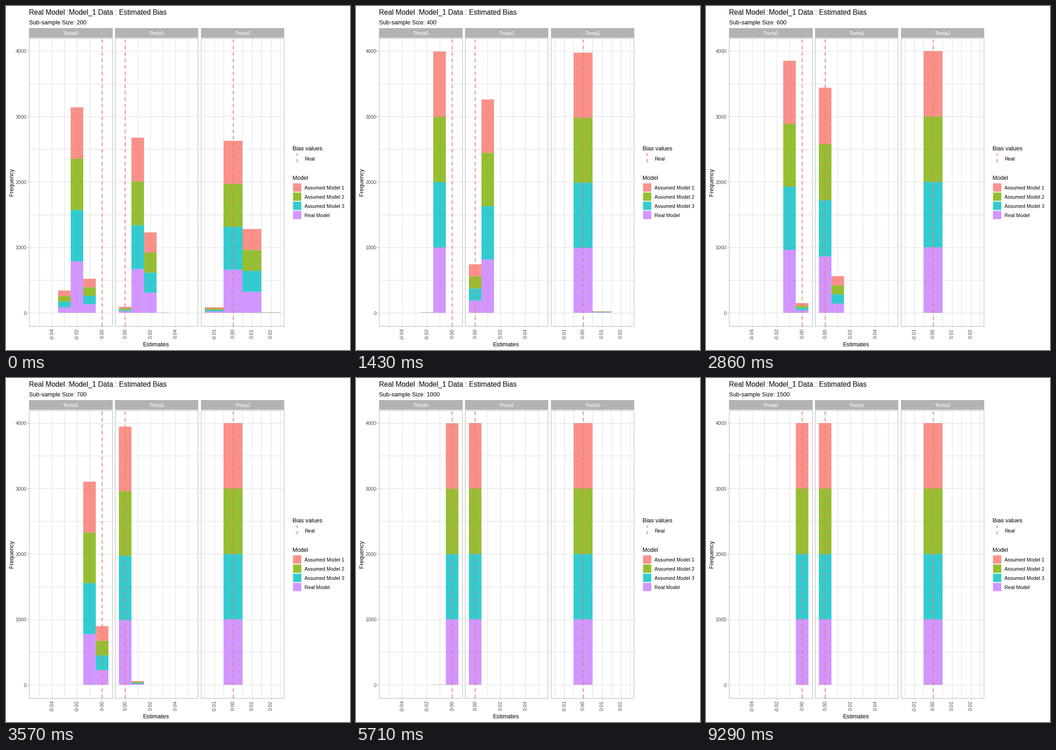
These frames come from a looping animation (748x748 px, 10000 ms). A matplotlib script:

```python
import math

import matplotlib.pyplot as plt
import numpy as np
from matplotlib.animation import FuncAnimation
from matplotlib.collections import PolyCollection
from matplotlib.patches import Rectangle

SIZE, DPI = 748, 100
PT = 72 / DPI
FRAMES, LOOP = 200, 10000
TOP, BOTTOM = 69.5, 695.5
Y0, Y_UNIT = 667.0, 0.14227
GREY, GRID, DARK, RED = "#b3b3b3", "#dedede", "#4d4d4d", "#f8766d"

# bottom to top of the stack
MODELS = [("Real Model", "#c77cff"), ("Assumed Model 3", "#00bfc4"),
          ("Assumed Model 2", "#7cae00"), ("Assumed Model 1", RED)]

# name, left, right, x of zero, pixels per bin, grid lines and labels in bins
PANELS = [
    ("Theta0", 50.5, 231.5, 209.0, 27.35, np.arange(-5, 1), (-4, -2, 0)),
    ("Theta1", 237.5, 417.5, 259.1, 27.35, np.arange(0, 6), (0, 2, 4)),
    ("Theta2", 424.5, 604.5, 493.6, 41.0, np.arange(-1.5, 3, 0.5),
     (-1, 0, 1, 2)),
]

# mean bias in bins (0.01) at key sample sizes, one row per panel
SIZES = range(200, 1501, 100)
KEYS = (200, 300, 400, 600, 800, 1000)
MEANS = [(-1.95, -1.245, -1.06, -0.653, -0.452, -0.365),
         (1.3, 0.87, 0.636, 0.407, 0.29, 0.23),
         (0.315, 0.19, 0.12, 0.08, 0.06, 0.05)]

plt.rcParams["font.family"] = "Liberation Sans"
fig = plt.figure(figsize=(SIZE / DPI, SIZE / DPI), dpi=DPI, facecolor="white")
ax = fig.add_axes([0, 0, 1, 1])
ax.set_xlim(0, SIZE)
ax.set_ylim(SIZE, 0)
ax.axis("off")


def text(x, y, s, px, color="black", ha="left", va="baseline", rot=0):
    return ax.text(x, y, s, fontsize=px * PT, color=color, ha=ha, va=va,
                   rotation=rot, zorder=5)


def line(x, y, color, z=1, px=1, **kw):
    ax.plot(x, y, color=color, lw=px * PT, zorder=z,
            solid_capstyle="butt", dash_capstyle="butt", **kw)


def dashed(x, top, bottom):
    line([x, x], [bottom, top], RED, 3, 1.75, linestyle=(0, (4, 4)))


def box(x, y, w, h, color, **kw):
    ax.add_patch(Rectangle((x, y), w, h, fc=color, ec="none", **kw))


def y_at(count):
    return Y0 - count * Y_UNIT


def draw_panel(name, left, right, zero, step, grid, labels):
    for n in range(0, 4001, 500):
        line([left, right], [y_at(n)] * 2, GRID)
    for x in zero + step * grid:
        line([x, x], [TOP, BOTTOM], GRID)
    for b in labels:
        x = zero + step * b
        line([x, x], [BOTTOM, BOTTOM + 3], GREY)
        text(x + 0.5, 701.5, f"{b / 100:.2f}", 11, DARK, "center", "top", 90)
    dashed(zero, TOP, BOTTOM)
    ax.add_patch(Rectangle((left, TOP), right - left, BOTTOM - TOP,
                           fc="none", ec=GREY, lw=PT, zorder=4))
    box(left - 0.5, 48, right - left + 1, 20.5, GREY, zorder=4)
    text((left + right) / 2, 63, name, 10.9, "white", "center")


def draw_legend():
    text(623.5, 314, "Bias values", 12.7)
    dashed(633, 320, 340)
    text(649, 335.5, "Real", 10.8)
    text(623.5, 377.5, "Model", 12.4)
    for i, (name, color) in enumerate(reversed(MODELS)):
        y = 385.6 + 19.95 * i
        box(624.1, y, 18, 18, color, alpha=0.8, snap=False)
        text(649, y + 13.6, name, 10.8)


for panel in PANELS:
    draw_panel(*panel)
for n in range(0, 4001, 1000):
    line([47.5, 50.5], [y_at(n)] * 2, GREY)
    text(45, y_at(n) + 4.5, str(n), 11, DARK, "right")
text(50, 19, "Real Model :Model_1 Data : Estimated Bias", 15.5)
subtitle = text(50, 40, "", 12.8)
text(327, 740, "Estimates", 13, ha="center")
text(13.5, 382.5, "Frequency", 12.7, ha="center", va="center", rot=90)
draw_legend()

stacks = []
for _, color in MODELS:
    stack = PolyCollection([], facecolors=color, edgecolors="none", alpha=0.8,
                           snap=False, zorder=2)
    ax.add_collection(stack, autolim=False)
    stacks.append(stack)


def below(x, mean, sd):
    return 0.5 * (1 + math.erf((x - mean) / (sd * math.sqrt(2))))


def bin_counts(size, means):
    """Expected samples of 1000 per bin for normally spread estimates."""
    mean = np.interp(size, KEYS, means)
    sd = 0.4 * (200 / size) ** 1.4
    for b in range(-5, 6):
        share = below(b + 0.5, mean, sd) - below(b - 0.5, mean, sd)
        yield b, round(1000 * share)


def update(frame):
    size = SIZES[((frame + 1) * len(SIZES) - 1) // FRAMES]
    subtitle.set_text(f"Sub-sample Size: {size}")
    verts = [[] for _ in MODELS]
    for (_, _, _, zero, step, *_), means in zip(PANELS, MEANS):
        for b, n in bin_counts(size, means):
            if not n:
                continue
            x0, x1 = zero + step * (b - 0.5), zero + step * (b + 0.5)
            for k, polys in enumerate(verts):
                lo, hi = y_at(k * n), y_at((k + 1) * n)
                polys.append([(x0, lo), (x1, lo), (x1, hi), (x0, hi)])
    for stack, polys in zip(stacks, verts):
        stack.set_verts(polys)
    return [subtitle, *stacks]


anim = FuncAnimation(fig, update, frames=FRAMES, interval=LOOP / FRAMES,
                     repeat=True, repeat_delay=0)
plt.show()
```
